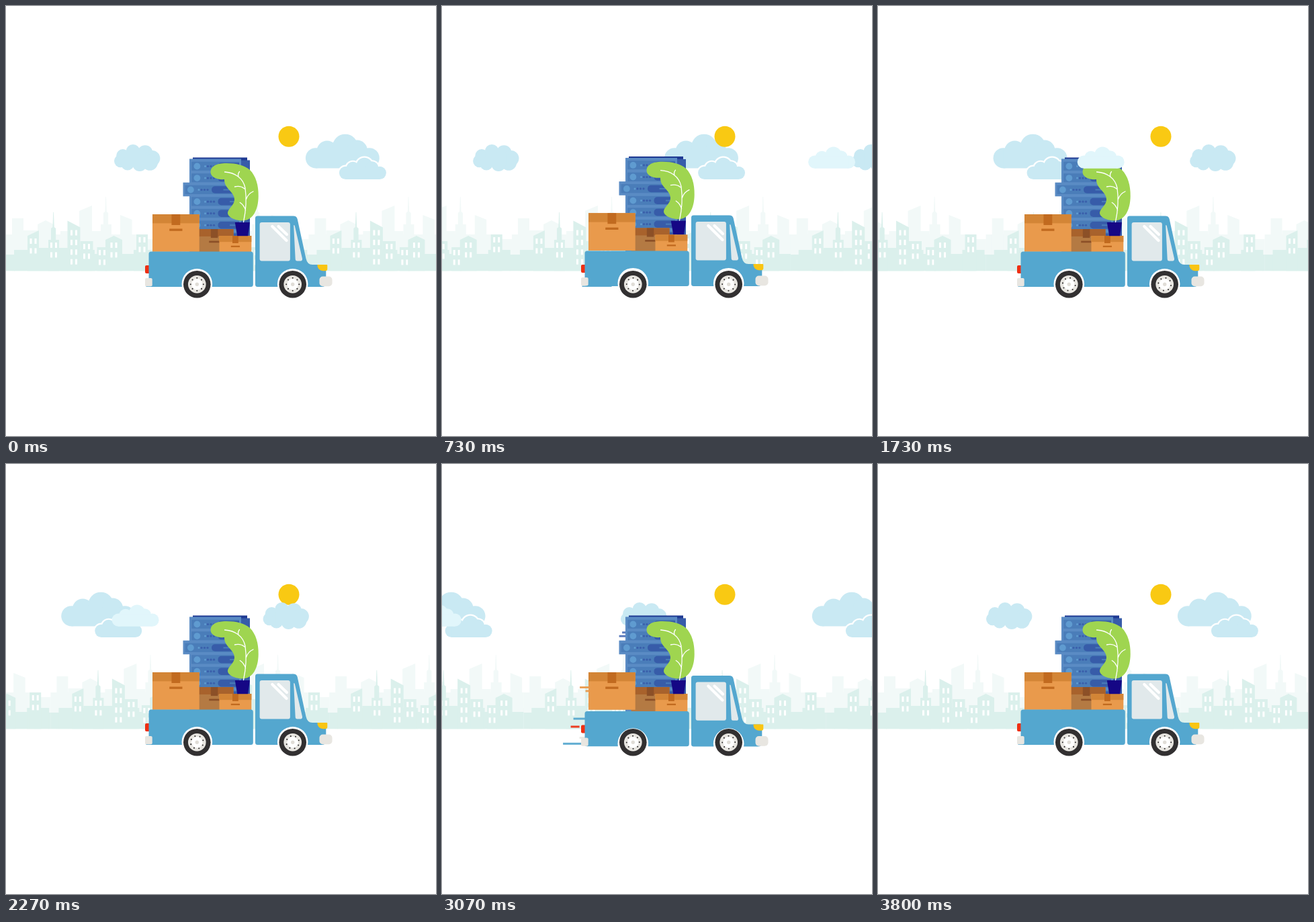
Write an HTML page with a canvas that moves like this. It is 640 px wide and 640 px high and loops after 3830 ms.

```html
<!DOCTYPE html>
<html lang="en">
<head>
<meta charset="utf-8">
<title>Delivery truck</title>
<style>
html, body { margin: 0; width: 100%; height: 100%; overflow: hidden; background: #fff; }
canvas { display: block; width: 640px; height: 640px; }
</style>
</head>
<body>
<canvas id="stage"></canvas>
<script>
const SIZE = 640, LOOP = 3830, STEP = 40, LAST = 95;
const canvas = document.getElementById('stage');
const ctx = canvas.getContext('2d');
const dpr = window.devicePixelRatio || 1;
canvas.width = canvas.height = SIZE * dpr;

// ---------- helpers ----------
function rect(x, y, w, h, color) {
  ctx.fillStyle = color;
  ctx.fillRect(x, y, w, h);
}

function round(x, y, w, h, r, color) {
  ctx.fillStyle = color;
  ctx.beginPath();
  ctx.roundRect(x, y, w, h, r);
  ctx.fill();
}

function disc(x, y, r, color) {
  ctx.fillStyle = color;
  ctx.beginPath();
  ctx.arc(x, y, r, 0, Math.PI * 2);
  ctx.fill();
}

function shape(d, color) {
  ctx.fillStyle = color;
  ctx.fill(new Path2D(d));
}

function lines(d, width) {
  ctx.strokeStyle = '#fff';
  ctx.lineWidth = width;
  ctx.lineCap = 'round';
  ctx.stroke(new Path2D(d));
}

function shifted(x, y, draw) {
  ctx.save();
  ctx.translate(x, y);
  draw();
  ctx.restore();
}

// Smooth bump from 0 to 1 and back around a centre
function pulse(p, centre, reach) {
  const k = (p - centre) / reach;
  return Math.abs(k) < 1 ? Math.cos(k * Math.PI / 2) ** 2 : 0;
}

// ---------- sky ----------
const SKY = '#c9e9f3', PALE = '#e1f6fb';

// Flat-bottomed cloud: bumps follow a half sine, the middle one is largest
function flatCloud(w, base, color, grow = 0) {
  for (const u of [0.137, 0.29, 0.535, 0.695, 0.86]) {
    const s = Math.sin(Math.PI * (u - 0.137) / 0.723);
    disc(u * w, base - (0.138 + 0.155 * s) * w, (0.138 + 0.036 * s ** 6) * w + grow, color);
  }
  rect(0.137 * w, base - 0.25 * w, 0.72 * w, 0.25 * w, color);
}

function bigCloud() {
  flatCloud(110, 241.5, SKY);
  shifted(50, 0, () => {
    flatCloud(70, 258, '#fff', 2.2);
    flatCloud(70, 258, SKY);
  });
}

// Round cloud: bumps on a ring that is taller above than below
function puffyCloud() {
  for (let i = 0; i < 8; i++) {
    const a = (168 + i * 45) * Math.PI / 180, s = Math.sin(a);
    disc(34 + 24 * Math.cos(a), 229 + 9.5 * s - 3.5 * s * s, 10.7 + 1.2 * Math.cos(a), SKY);
  }
  rect(20, 220, 30, 16, SKY);
}

// One copy leaves to the left while the next arrives at the same home
function drift(home, n, draw) {
  shifted(home - 6.38 * n, 0, draw);
  shifted(home + 5.83 * (LAST - n), 0, draw);
}

// ---------- skyline ----------
const GROUND = 394.5, TILE = 225.2;

function windows(x, w, y, rows) {
  for (let r = 0; r < rows; r++)
    for (const dx of [0, 7]) rect(x + (w - 10) / 2 + dx, y + 4 + r * 14.4, 3, 8, '#fff');
}

// Roof runs from left to right height, over a peak when one is given
function building(x, w, left, right, color, rows = 0, peak = (left + right) / 2) {
  shape(`M${x} ${GROUND}V${left}L${x + w / 2} ${peak}L${x + w} ${right}V${GROUND}Z`, color);
  windows(x, w, Math.max(left, right), rows);
}

function tower(x, top, color, rows) {
  building(x, 16, top, top, color, rows);
  shape(`M${x + 4} ${top}v-17l2.4 -2l.8 -22h.8l.8 22l2.4 2v17Z`, color);
}

function farRow() {
  const c = '#f2f9f8', block = (x, w, top) => building(x, w, top, top, c);
  block(0, 209, 340);
  block(200, 25.3, 347);
  block(9, 17, 316);
  block(26, 22, 334);
  building(47, 24, 325, 325, c, 0, 319);
  block(81, 60, 335);
  building(109, 19, 305, 297, c);
  tower(141, 325, c, 0);
  building(170, 17.5, 311, 318, c);
}

function nearRow() {
  const c = '#dbf0ec', block = (x, w, top, rows) => building(x, w, top, top, c, rows);
  block(0, 13, 370);
  block(12, 120, 363);
  block(130, 64, 369);
  block(190, 33, 363);
  block(222, 3.3, 370);
  building(32, 17, 342, 334, c, 2);
  block(49, 43, 360);
  tower(63, 348, c, 2);
  building(91.5, 19, 319.5, 329.5, c, 4);
  block(110.5, 19, 350, 2);
  block(135.5, 15, 359, 2);
  building(148, 25, 348, 348, c, 2, 342);
  block(194, 17, 340, 2);
}

function strip(x) {
  shifted(x, 0, () => {
    ctx.beginPath();
    ctx.rect(0, 270, SIZE + 0.5, GROUND - 270);
    ctx.clip();
    for (const row of [farRow, nearRow])
      for (let i = 0; i < 3; i++) shifted(i * TILE, 0, row);
  });
}

function skyline(n) {
  const s = n * SIZE / LAST;
  strip(-s);
  strip(SIZE - s);
}

// ---------- cargo ----------
function unit(x, y) {
  rect(x, y - 10.8, 77, 20.6, '#5a8bc4');
  rect(x + 3, y - 6.8, 71, 13.2, '#4a7db9');
  disc(x + 11.4, y, 4.9, '#5f9bd0');
  disc(x + 23.5, y, 1.5, '#5f9bd0');
  for (let i = 0; i < 3; i++) disc(x + 27.5 + i * 4.5, y, 1.6, '#3a5fab');
  round(x + 42.5, y - 5.3, 31.5, 10.6, [5, 0, 0, 5], '#375ca9');
  rect(x + 60, y - 1, 11, 2, '#4a7db9');
}

function rack() {
  rect(278, 225.5, 81, 5, '#1f3a93');
  rect(350, 229.5, 13, 143, '#375ca9');
  rect(273, 227.7, 77, 145, '#5a8bc4');
  for (let i = 0; i < 7; i++) if (i !== 2) unit(273, 238.5 + i * 17.55);
  unit(263.5, 273.5);
}

// Tape, band and label scale with the width
function carton(x, y, w, h, [face, top, dark]) {
  const middle = x + w / 2;
  rect(x, y, w, h, face);
  rect(x, y, w, 0.192 * w, top);
  rect(middle - 0.092 * w, y, 0.184 * w, 0.23 * w, dark);
  rect(middle - 0.138 * w, y + 0.308 * w, 0.276 * w, 0.048 * w, dark);
}

const ORANGE = ['#e99a4c', '#d38536', '#c16a1f'];
const BROWN = ['#b47a43', '#a8622c', '#8c5027'];

function plant() {
  shape('M340.8 322H363L360 342.3H344.2Z', '#150785');
  shape('M304.5 247C304.5 240 311 234.5 325 234C341 233.5 354 236.5 363 244C372 253 376 267 375.7 283C375.6 304 367 319.5 352 319.5C342 319.5 330 314.5 330 308C330 301.5 340 297 340 288C340 276 324.5 272 325 258C316 259 304.5 255.5 304.5 247Z', '#9fd550');
  lines('M353.5 321.5C357 305 358 285 356 271C353 256 341 248 325.5 247M346 254.5Q344.5 250 347.5 246.5M355 272Q349 267 340.5 269M357.3 288Q360 279.5 368 276M356.6 304Q354 296 348.3 292.5', 1.3);
}

// ---------- truck ----------
const BLUE = '#54a7cf', RED = '#ee2f12', METAL = '#e8e6e1', GLASS = '#e1e9eb';
const WHEELS = [284.3, 426.7], AXLE = 414.2;

function body() {
  round(207, 386, 8, 12, 2, RED);
  round(212.5, 365.5, 155.3, 52.4, 3.5, BLUE);
  round(207, 405, 10.7, 12.3, 2, METAL);
  shape('M371 316Q371 312.6 374.5 312.6H427.5Q432.5 312.6 433.7 317L446.5 376Q448.5 385 456 385H473Q476.3 385 476.3 388V412Q476.3 418 470 418H374.5Q371 418 371 414.5Z', BLUE);
  round(377.6, 322, 45.3, 57.4, 3, GLASS);
  lines('M396.3 328L417.5 349M405.5 328L418 340', 4.2);
  shape('M428.2 327Q428.6 325 429.7 327L441 376Q441.3 379.4 438.5 379.4H433Q430.8 379.4 430.7 377Z', GLASS);
  round(463.5, 385, 14.8, 9.2, [0, 1, 3, 8], '#f9c513');
  round(466.5, 402.5, 19, 14.8, 5, METAL);
  for (const x of WHEELS) disc(x, AXLE - 0.5, 22.8, '#fff');
}

function wheel(x, angle) {
  disc(x, AXLE, 20.3, '#323031');
  disc(x, AXLE, 13.3, METAL);
  disc(x, AXLE, 8.2, '#fff');
  disc(x, AXLE, 2.7, '#e0ddd7');
  for (let i = 0; i < 8; i++) {
    const a = angle + i * Math.PI / 4;
    disc(x + 9.5 * Math.cos(a), AXLE + 9.5 * Math.sin(a), 1.05, '#323031');
  }
}

// Speed lines shoot out to the left and fade
function streaks(p) {
  if (p < 0 || p > 17) return;
  const streak = (x, y, w, color) => rect(x, y, w, 3, color);
  const pair = (x, y, w, dx, color) => {
    streak(x, y, w, color);
    streak(x + dx, y + 5.4, w * 0.6, color);
  };
  ctx.globalAlpha = Math.min(1, 1.2 - p * 0.07);
  shifted((8 - p) * 10.9, 0, () => {
    pair(224.5, 249.3, 22, -4.5, '#4d6fb8');
    pair(161.5, 331, 38.5, 8.5, ORANGE[0]);
    streak(152, 377.6, 24, BLUE);
    streak(148, 389.5, 13, RED);
    streak(166, 389.5, 23, RED);
    streak(161, 406, 23, METAL);
    streak(136.5, 414.8, 43, BLUE);
  });
  ctx.globalAlpha = 1;
}

// Two bumps in the road: everything rises, the body dips, the load is tossed
function truck(n) {
  const p = n - (n < 45 ? 21 : 73);
  const rise = pulse(p, -2, 4), dip = pulse(p, 5, 5), toss = pulse(p, 8.5, 4.5);
  const load = (up, high, draw) => shifted(0, -up * rise - high * toss, draw);

  streaks(p);
  load(1.8, 4.6, () => {
    rack();
    carton(281.6, 332, 57, 42, BROWN);
  });
  load(1.8, 6.2, () => carton(317.5, 342, 47.8, 32, ORANGE));
  load(2.7, 12.2, plant);
  load(2.1, 2.8, () => carton(218, 310, 69.7, 55.8, ORANGE));
  rect(208.5, 416.4, 44, 1.5, BLUE);
  shifted(0, 2.7 * dip - 1.2 * rise, body);
  for (const x of WHEELS) wheel(x, n / LAST * Math.PI * 4);
}

// ---------- scene ----------
function draw(time) {
  const n = Math.min(LAST, Math.floor((time % LOOP + 10.5) / STEP));
  ctx.setTransform(dpr, 0, 0, dpr, 0, 0);
  rect(0, 0, SIZE, SIZE, '#fff');
  drift(446, n, bigCloud);
  disc(421, 194.2, 15.5, '#f9c913');
  drift(160, n, puffyCloud);
  skyline(n);
  truck(n);
  shifted(724 - 9.935 * n, 0, () => flatCloud(70, 241.8, PALE));
}

const start = performance.now();
function tick() {
  draw(performance.now() - start);
  requestAnimationFrame(tick);
}
tick();
</script>
</body>
</html>
```
